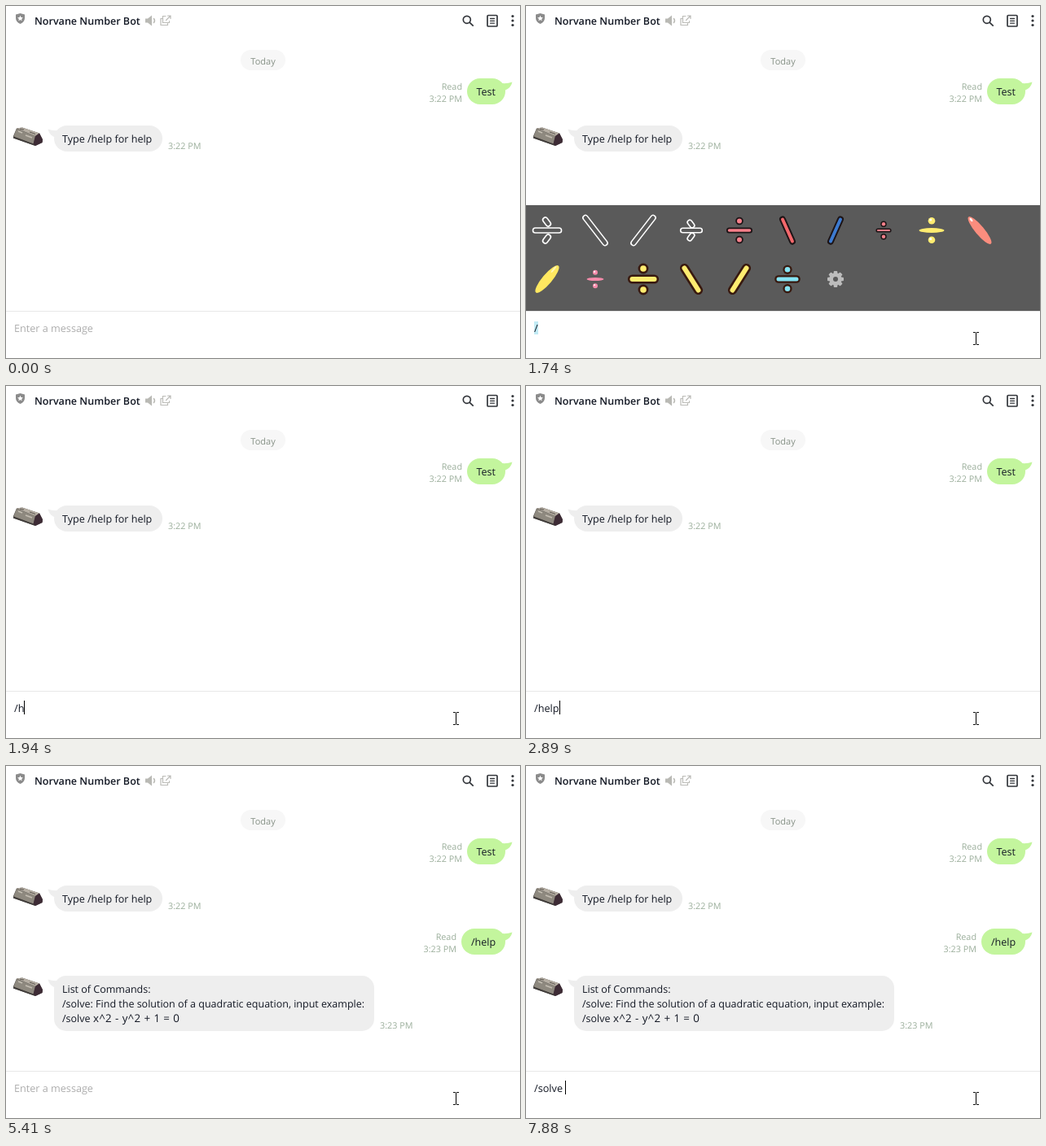
These frames come from a looping animation (631 px wide and 433 px high, 8 s). An HTML page:

```html
<!DOCTYPE html>
<html lang="en">
<head>
<meta charset="utf-8">
<title>Chat bot</title>
<style>
html, body { margin: 0; width: 100%; height: 100%; overflow: hidden; background: #fff; }
svg { display: block; }
text { font: 12.55px "Open Sans", "Noto Sans", sans-serif; fill: #131824; white-space: pre; text-rendering: geometricPrecision; }
.title { font-size: 12.55px; font-weight: 600; }
.meta { font-size: 10.8px; fill: #9bae9b; }
.end { text-anchor: end; }
.day { font-size: 11px; fill: #869186; text-anchor: middle; }
.hint { font-size: 12.63px; fill: #adadad; }
.list { font-size: 12.5px; }
.formula { font-size: 13.3px; letter-spacing: .45px; }
#typed { font-size: 12.7px; }
.line { fill: none; stroke-linecap: round; }
.sent { fill: #c3f59d; }
.got { fill: #eee; }
</style>
</head>
<body>
<svg width="631" height="433" viewBox="0 0 631 433">
  <defs>
    <g id="ingot">
      <path d="M9 160 13 150.500 20 149.500 41 156.500 45 164 44.500 168 36 172 9 162.500Z" fill="#55504c"/>
      <path d="M13 150.500 20 149.500 41 156.500 36 160Z" fill="#b5aea3"/>
      <path d="M13 151 36 160 33.500 169.500 9.500 160.500Z" fill="#8e897f"/>
      <path d="M36 160 41 156.500 45 164.500 44.500 168 36 172 33.500 170Z" fill="#3d2b35"/>
      <path d="M9 160.500 33.500 169.500 36 172 9 162.500Z" fill="#3f3b39"/>
      <path d="M15 154 20 156M24 159 32 162" stroke="#c4beb3" stroke-width="1.500" fill="none"/>
      <path d="M17 151 22 152M29 155 36 157.500" stroke="#5c5751" fill="none"/>
    </g>
    <path id="tailOut" class="sent" d="M603 5Q613 7.500 621.500 4.500Q620 12 612 15Z"/>
    <path id="tailIn" class="got" d="M69 5Q60 7.500 51.500 4.500Q53 12 61 15Z"/>
  </defs>

  <g id="header">
    <path d="M17.500 9 23 10.500V15Q23 19.500 17.500 22Q12 19.500 12 15V10.500Z" fill="#8b8b8b"/>
    <path d="M17.500 11.800 18.500 14.100 20.900 14.300 19.100 15.900 19.600 18.300 17.500 17 15.400 18.300 15.900 15.900 14.100 14.300 16.500 14.100Z" fill="#fff"/>
    <text class="title" x="35" y="23">Norvane Number Bot</text>
    <path d="M171 15.500H174L179 11.500V24.500L174 20.500H171Z" fill="#b9b9b4"/>
    <path class="line" d="M181.500 15.500Q183.500 18 181.500 20.500" stroke="#b9b9b4" stroke-width="1.400"/>
    <path class="line" d="M196 12.500H192.500V20.500H200.500V18.500M192 15.500H190V23.500H198.500V21.500M198.500 12H202V15.500M201.500 12.500 196.500 17.500" stroke="#bcbcb8" stroke-width="1.200"/>
    <g class="line" stroke="#33363b" stroke-width="1.700">
      <circle cx="565.800" cy="16.800" r="4.500"/>
      <path d="M569.300 20.300 573.200 24.200"/>
      <rect x="591" y="11.500" width="12" height="13.500" rx="1"/>
      <path d="M594.500 15.500H599.500M594.500 18.300H599.500M594.500 21.100H599.500" stroke-width="1.300"/>
    </g>
    <g fill="#33363b"><circle cx="622" cy="12.500" r="1.600"/><circle cx="622" cy="18" r="1.600"/><circle cx="622" cy="23.500" r="1.600"/></g>
  </g>

  <rect x="288" y="54" width="55" height="25" rx="12.500" fill="#f7f7f7"/>
  <text class="day" x="315.500" y="72">Today</text>

  <use href="#tailOut" y="89"/>
  <rect class="sent" x="566" y="89" width="47" height="32" rx="16"/>
  <text x="577.500" y="110">Test</text>
  <text class="meta end" x="560" y="103">Read</text>
  <text class="meta end" x="560" y="118">3:22 PM</text>

  <use href="#ingot"/>
  <use href="#tailIn" y="147"/>
  <rect class="got" x="59" y="147" width="133" height="32" rx="16"/>
  <text x="69" y="168">Type /help for help</text>
  <text class="meta" x="199" y="176">3:22 PM</text>

  <g id="sent">
    <use href="#tailOut" y="200"/>
    <rect class="sent" x="559" y="200" width="54" height="32" rx="16"/>
    <text x="571" y="221">/help</text>
    <text class="meta end" x="553" y="229">3:23 PM</text>
  </g>
  <text id="read" class="meta end" x="553" y="214">Read</text>

  <g id="reply">
    <use href="#ingot" y="111"/>
    <use href="#tailIn" y="258"/>
    <rect class="got" x="59" y="258" width="393" height="68" rx="15"/>
    <text class="list" x="69" y="279">List of Commands:</text>
    <text class="list" x="69" y="297">/solve: Find the solution of a quadratic equation, input example:</text>
    <text class="list" x="69" y="315">/solve</text>
    <text class="formula" x="107" y="315">x^2 - y^2 + 1 = 0</text>
    <text class="meta" x="459" y="323">3:23 PM</text>
  </g>

  <g id="panel"><rect y="245" width="631" height="130" fill="#5a5a5a"/></g>

  <path d="M0 375.500H631" stroke="#e8e8e8"/>
  <rect id="mark" x="10" y="388" width="5" height="16" fill="#c2ebf5"/>
  <text id="hint" class="hint" x="10" y="401">Enter a message</text>
  <text id="typed" x="10" y="401"></text>
  <rect id="caret" y="387" width="1" height="17"/>
  <path id="beam" d="M0 .5H3M4 .5H7M3.500 1V15M0 15.500H3M4 15.500H7" stroke="#000" fill="none"/>
</svg>
<script>
const LOOP = 8000;
const $ = id => document.getElementById(id);
const panel = $("panel");

function add(tag, attrs) {
  const el = document.createElementNS("http://www.w3.org/2000/svg", tag);
  for (const k in attrs) el.setAttribute(k, attrs[k]);
  panel.appendChild(el);
}

// Rounded stroke centred on (x, y) with a contrasting edge.
function bar(x, y, dx, dy, w, fill, edge, rim = 2) {
  const d = `M${x - dx} ${y - dy}L${x + dx} ${y + dy}`;
  add("path", { d, class: "line", stroke: edge, "stroke-width": w + 2 * rim });
  add("path", { d, class: "line", stroke: fill, "stroke-width": w });
}

function oval(x, y, rx, ry, turn, fill) {
  add("ellipse", { cx: x, cy: y, rx, ry, fill, transform: `rotate(${turn} ${x} ${y})` });
}

function divide(x, y, half, w, gap, r, fill, edge, rim) {
  bar(x, y, half, 0, w, fill, edge, rim);
  for (const s of [-1, 1]) bar(x, y + s * gap, .01, 0, 2 * r, fill, edge, rim);
}

function chalkDivide(x, y, half, w, gap, tilt) {
  for (const s of [-1, 1]) bar(x - .5, y + s * gap, tilt, -s * tilt * 1.3, w, "#5a5a5a", "#fff", 1.6);
  bar(x, y, half, 0, w, "#5a5a5a", "#fff", 1.6);
}

function glossDivide(x, y, rx, ry, gap, r, fill) {
  oval(x, y, rx, ry, 0, fill);
  for (const s of [-1, 1]) {
    oval(x, y + s * gap, r, r, 0, fill);
    oval(x - r * .3, y + s * gap - r * .3, r * .35, r * .35, 0, "#fff");
  }
}

function drawStickers() {
  const col = i => 26 + 59 * i, a = 276, b = 336;
  const ink = "#1d1416", brown = "#38190f", grey = "#5a5a5a", yellow = "#ffec70";
  chalkDivide(col(0), a, 14.5, 4.5, 10.5, 1.8);
  bar(col(1), a, 12, 15.5, 4.5, grey, "#fff", 1.6);
  bar(col(2), a, -12, 15.5, 4.5, grey, "#fff", 1.6);
  chalkDivide(col(3), a, 10.5, 4, 8, 1.5);
  divide(col(4), a, 12.5, 3.5, 11.5, 3, "#f6808b", ink, 1.8);
  bar(col(5), a, 6, 13.5, 4, "#f4686c", ink, 2);
  bar(col(6), a, -6, 13.5, 4, "#3d7bd0", ink, 2);
  divide(col(7), a, 7, 2.2, 7.8, 2.2, "#f6808b", ink, 1.5);
  glossDivide(col(8), a, 15.5, 3, 11.8, 4.3, yellow);
  oval(col(9), a, 21.5, 5.5, 50, "#fa8d7e");
  oval(col(9) - 10.5, a - 13, 2.6, 1.3, 50, "#fff");
  oval(col(0), b, 21.5, 6, -50, "#ffe860");
  oval(col(0) + 8, b - 12, 5, 1, -50, "#fff6b8");
  glossDivide(col(1), b, 10.5, 2, 8.2, 3, "#f58cab");
  divide(col(2), b, 13.5, 6, 13, 3.8, yellow, brown, 2.6);
  bar(col(3), b, 8.5, 13.5, 6, yellow, brown, 2.6);
  bar(col(4), b, -8.5, 13.5, 6, yellow, brown, 2.6);
  divide(col(5), b, 11, 5, 11.7, 3.3, "#86e4f4", brown, 2.3);
  for (let k = 0; k < 4; k++)
    add("rect", { x: col(6) - 2.3, y: b - 10, width: 4.6, height: 20, rx: 1, fill: "#bcbcbc",
      transform: `rotate(${k * 45} ${col(6)} ${b})` });
  oval(col(6), b, 7.8, 7.8, 0, "#bcbcbc");
  oval(col(6), b, 3, 3, 0, grey);
}
drawStickers();

// time, text, caret shown
const typing = [
  [0, "", 0], [680, "", 1], [1210, "", 0],
  [1540, "/", 1], [1740, "/", 0], [1810, "/", 1], [1940, "/h", 1],
  [2020, "/hl", 1], [2220, "/hl", 0], [2550, "/hl", 1], [2620, "/h", 1],
  [2690, "/he", 1], [2820, "/hel", 1], [2890, "/help", 1], [3090, "/help", 0],
  [3220, "", 1], [3290, "", 0], [3820, "", 1], [4350, "", 0], [4880, "", 1], [5410, "", 0],
  [5740, "/", 1], [5870, "/s", 1], [6020, "/so", 1], [6290, "/sov", 1], [6490, "/sov", 0],
  [6950, "/sov", 1], [7020, "/so", 1], [7220, "/sol", 1], [7420, "/solv", 1],
  [7550, "/solve", 1], [7880, "/solve ", 1]
];

// time, pointer left, pointer top
const pointer = [
  [0, 700, 500], [70, 580, 418], [130, 562, 408], [200, 551, 402], [400, 550, 401],
  [600, 554, 403], [670, 556, 404], [740, 553, 402], [810, 549, 401]
];

const at = (steps, t) => steps.findLast(s => s[0] <= t);
const show = (id, on) => { $(id).style.display = on ? "" : "none"; };

function render(t) {
  const [, text, caret] = at(typing, t);
  const [, px, py] = at(pointer, t);
  $("typed").textContent = text;
  $("caret").setAttribute("x", 10 + Math.round(text ? $("typed").getComputedTextLength() : 0));
  $("beam").setAttribute("transform", `translate(${px} ${py})`);
  const suggesting = t >= 1740 && t < 1940;
  show("caret", caret);
  show("hint", !text);
  show("panel", suggesting);
  show("mark", suggesting);
  show("sent", t >= 3220);
  show("read", t >= 3750);
  show("reply", t >= 3890);
}

let start;
function tick(now) {
  start ??= now;
  render((now - start) % LOOP);
  requestAnimationFrame(tick);
}
render(0);
requestAnimationFrame(tick);
</script>
</body>
</html>
```
